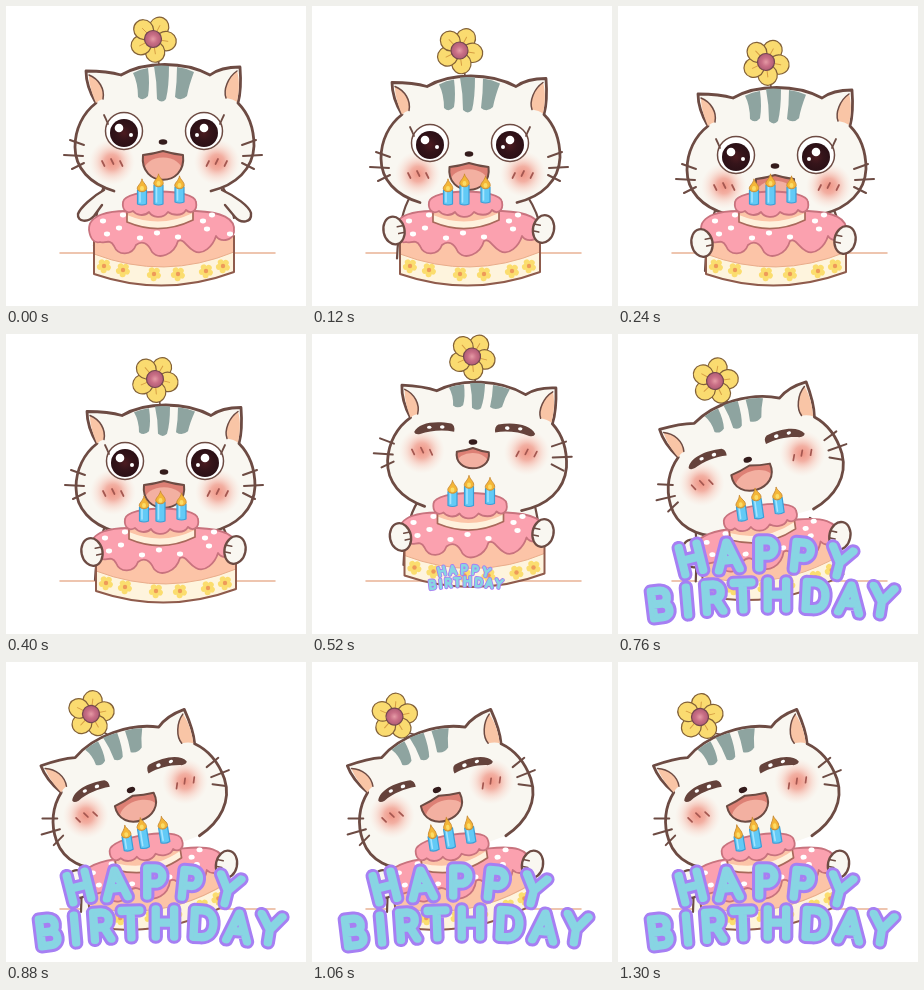
Write an HTML page with a canvas that moves like this. It is 300 px wide and 300 px high and loops after 2.3 s.

```html
<!DOCTYPE html>
<html lang="en">
<head>
<meta charset="utf-8">
<title>Happy Birthday</title>
<style>
html, body { margin: 0; width: 100%; height: 100%; overflow: hidden; background: #fff; }
canvas { display: block; width: 300px; height: 300px; }
</style>
</head>
<body>
<canvas id="stage"></canvas>
<script>
const canvas = document.getElementById('stage');
const ratio = window.devicePixelRatio || 1;
canvas.width = canvas.height = 300 * ratio;
const c = canvas.getContext('2d');

const LOOP = 2300, BROWN = '#6d4b43', FUR = '#f9f7f1', PINK = '#fba1af', ROSE = '#c8737e';

// head, nose, flower, cake: x, y, degrees; size: stripe length, mouth width, mouth height
const poses = [
  { t: 0, head: [157, 130, 0], nose: [157, 136, 0], flower: [147, 33, 0], cake: [158, 240, 0],
    left: [80, 212], right: [236, 212], size: [35, 40, 28] },
  { t: 240, head: [157, 153, 0], nose: [157, 160, 0], flower: [148, 56, 2], cake: [158, 240, 0],
    left: [84, 237], right: [227, 234], size: [34, 38, 24] },
  { t: 400, head: [158, 142.5, 0], nose: [158, 138, 0], flower: [149, 45, 4], cake: [160, 229, 0],
    left: [86, 218], right: [229, 216], size: [29, 40, 26] },
  { t: 520, head: [164, 119.5, 2.5], nose: [161, 108, 1], flower: [160, 22.5, 4], cake: [162.5, 213.5, 0],
    left: [88.5, 203], right: [231, 199], size: [26, 32, 19] },
  { t: 640, head: [147, 128, -6], nose: [144, 119, -9], flower: [133, 32, -6], cake: [157, 220.5, -5],
    left: [83, 212], right: [226, 200], size: [26, 38, 22] },
  { t: 880, head: [129.5, 138.5, -20], nose: [125, 128, -19], flower: [85, 52, -20], cake: [151, 226, -9],
    left: [72, 222], right: [220.5, 202.5], size: [26, 41, 25] },
  { t: 1120, head: [130, 138.5, -20], nose: [125, 128, -19], flower: [82, 55, -22], cake: [151, 226, -9],
    left: [72, 222], right: [220.5, 202.5], size: [26, 41, 25] }
];
const textScale = { 8: 0.3, 9: 1.1, 10: 0.8, 11: 1.04 };

function poseAt(t) {
  const n = poses.findIndex(p => p.t > t);
  if (n < 0) return poses[poses.length - 1];
  const a = poses[n - 1], b = poses[n];
  const u = (t - a.t) / (b.t - a.t);
  const k = a.t === 640 ? 1 - (1 - u) * (1 - u) : (1 - Math.cos(Math.PI * u)) / 2;
  const out = {};
  for (const key in a) if (key !== 't') out[key] = a[key].map((v, i) => v + (b[key][i] - v) * k);
  return out;
}

function at(x, y, deg, draw) {
  c.save();
  c.translate(x, y);
  c.rotate(deg * Math.PI / 180);
  draw();
  c.restore();
}

function shape(d, fill, stroke, width = 2) {
  const p = typeof d === 'string' ? new Path2D(d) : d;
  if (fill) { c.fillStyle = fill; c.fill(p); }
  if (stroke) { c.strokeStyle = stroke; c.lineWidth = width; c.stroke(p); }
}

function oval(x, y, rx, ry, fill, stroke, width, turn = 0) {
  const p = new Path2D();
  p.ellipse(x, y, rx, ry, turn, 0, Math.PI * 2);
  shape(p, fill, stroke, width);
}

function glow(x, y, r, stops) {
  const g = c.createRadialGradient(x, y, 0, x, y, r);
  stops.forEach((s, i) => g.addColorStop(i / (stops.length - 1), s));
  oval(x, y, r, r, g);
}

function petals(x, y, dist, r, turn, fill, stroke) {
  for (let i = 0; i < 5; i++) {
    const a = turn + i * Math.PI * 0.4;
    oval(x + dist * Math.cos(a), y + dist * Math.sin(a), r, r * 0.95, fill, stroke, 1.2, a);
  }
}

function drawFlower(p) {
  const [x, y, deg] = p.flower, a = p.head[2] * Math.PI / 180;
  const sx = p.head[0] - 4 * Math.cos(a) + 72 * Math.sin(a);
  const sy = p.head[1] - 4 * Math.sin(a) - 72 * Math.cos(a);
  shape(`M${x} ${y}Q${x + 4} ${y + 15} ${sx} ${sy}`, null, BROWN, 1.6);
  at(x, y, deg, () => {
    const turn = -1.1;
    petals(0, 0, 13.2, 10.2, turn, '#fadb70', '#826037');
    for (let i = 0; i < 5; i++) {
      const t = turn + i * Math.PI * 0.4;
      shape(`M${8 * Math.cos(t)} ${8 * Math.sin(t)}L${15 * Math.cos(t)} ${15 * Math.sin(t)}`, null, '#d69d43', 1);
    }
    glow(0, 0, 8.5, ['#e59aa5', '#c96f86', '#b05c75']);
    oval(0, 0, 8.5, 8.5, null, '#744750', 1.2);
  });
}

function drawHead(p) {
  at(...p.head, () => {
    c.translate(-157, -130);
    shape(`M108 185C84 178 69 162 69 141C69 123 77 107 90 97C84 87 80 76 80 65
      C92 65 105 66 115 69C139 55 178 55 204 69C212 63 223 61 234 61
      C235 74 235 86 232 97C243 108 248 124 248 140C247 163 230 179 205 185`, FUR, BROWN, 2.8);
    shape('M83 69C93 73 99 83 97 93Q93 94 90 97C86 88 83 78 83 69Z', '#f9c5a6');
    shape('M83 69C93 73 99 83 97 93', null, BROWN, 1.5);
    shape('M231 65C222 71 217 84 220 92Q227 93 231 96C233 86 234 75 231 65Z', '#f9c5a6');
    shape('M231 65C222 71 217 84 220 92', null, BROWN, 1.5);
    c.translate(-1, 60);
    c.scale(1, p.size[0] / 35);
    shape('M128 7Q135 3 143 2Q145 18 143 30Q138 36 133 31Q133 17 128 7Z', '#8ea4a0');
    shape('M149 0Q156 -1 164 0Q164 21 161 33Q157 38 152 33Q152 16 149 0Z', '#8ea4a0');
    shape('M172 1Q181 2 189 6Q184 19 182 30Q176 36 170 31Q172 16 172 1Z', '#8ea4a0');
  });
}

function openEye(x, side) {
  oval(x, -11, 18.5, 18.5, '#fff', BROWN, 1.5);
  glow(x, -9, 14, ['#4c1b20', '#35141a', '#2b1016']);
  oval(x - 5 * (side < 0 ? 1 : 0), -14, 4.3, 4.3, '#fff');
  oval(x + 7 * (side < 0 ? 1 : -1), -7, 2, 2, '#fff');
  shape(`M${x + side * 16} -18Q${x + side * 18} -23 ${x + side * 20} -27`, null, BROWN, 1.8);
}

function shutEye(x, y, side) {
  c.save();
  c.translate(x, y);
  c.scale(side, 1);
  shape('M-20 4C-16 -5 0 -8 17 -5Q21 -3 20 3C9 1 -4 2 -14 6Q-19 7 -20 4Z', '#65423b');
  oval(-5, -1, 2.2, 1.6, '#fff');
  oval(8, -1.5, 2.3, 1.8, '#fff');
  c.restore();
}

function drawFace(p, happy) {
  at(...p.nose, () => {
    const by = happy ? 9.5 : 20;
    for (const s of [-1, 1]) {
      const bx = s < 0 ? -51 : 54;
      glow(bx, by, 23, ['rgba(238,142,126,.95)', 'rgba(241,156,141,.78)', 'rgba(247,196,183,.42)', 'rgba(250,222,212,0)']);
      for (const k of [-1, 0, 1])
        shape(`M${bx + k * 9 + s} ${by - 3 + k * k * 2}l${-s * 2.5} 5`, null, '#a45750', 1.7);
      shape(`M${s * 79} 3L${s * 93} -2M${s * 80} 14L${s * 99} 13M${s * 79} 21L${s * 91} 27`, null, BROWN, 2);
    }
    if (happy) {
      shutEye(-39, -13, 1);
      shutEye(42, -13, -1);
    } else {
      openEye(-39, -1);
      openEye(41, 1);
    }
    oval(0, 0, 4.3, 2.8, '#351c1c');

    const [, w, h] = p.size, x = w / 2, top = happy ? 8 : 11;
    const m = new Path2D(`M${-x} ${top + 2}Q${-x / 2} ${top + 1} 0 ${top - 2}Q${x / 2} ${top + 1} ${x} ${top + 2}
      C${x * 1.2} ${top + h * 1.25} ${-x * 1.2} ${top + h * 1.25} ${-x} ${top + 2}Z`);
    shape(m, '#dd8075');
    c.save();
    c.clip(m);
    oval(0, top + h * 0.68, x * 0.98, h * 0.52, '#f3b0a1');
    c.restore();
    shape(m, null, BROWN, 2);
  });
}

function drawBody(p, raised) {
  const [hx, hy] = p.head, [lx, ly] = p.left, [rx, ry] = p.right;
  const x1 = hx - 58, x2 = hx + 58, y1 = hy + 48;
  const l = raised ? 88 : lx + 3, r = raised ? 228 : rx - 3;
  shape(`M${x1} ${y1}Q${l + 2} ${y1 + 18} ${l} ${ly + 28}L${r} ${ry + 28}Q${r - 2} ${y1 + 18} ${x2} ${y1}Z`, FUR);
  shape(`M${x1} ${y1}Q${l + 2} ${y1 + 18} ${l} ${ly + 28}`, null, BROWN, 2.2);
  shape(`M${x2} ${y1}Q${r - 2} ${y1 + 18} ${r} ${ry}`, null, BROWN, 2.2);
  if (raised) at(0, hy - 130, 0, () => {
    shape('M98 184C87 190 74 202 72 208C71 216 82 217 88 210L96 199', FUR, BROWN, 2.4);
    shape('M216 184C229 190 243 200 245 207C246 217 235 218 229 211L219 199', FUR, BROWN, 2.4);
  });
}

function drawFlame(x, y, s) {
  at(x, y, 0, () => {
    c.scale(s, 2 - s);
    shape('M0 -7C1 -3 5 -1 4.5 3C3 7 -3 7 -4.5 3C-5 0 -1 -2 0 -7Z', '#f4b637', '#c98b35', 0.9);
    oval(0, 2.5, 1.9, 2.5, '#fbdc66');
  });
}

function drawCake(p, step) {
  at(...p.cake, () => {
    c.translate(-158, -240);
    shape('M88 222V268Q158 292 228 266V222Z', '#fcc4a7');
    shape('M88 248Q158 275 228 246V266Q158 292 88 268Z', '#fef4dd');
    shape('M88 248Q158 275 228 246', null, '#e9ad8b', 1);
    for (const [x, y] of [[98, 260], [117, 264], [148, 268], [172, 268], [200, 265], [217, 260]]) {
      petals(x, y, 4, 3.2, 0.4, '#fbdd6e');
      oval(x, y, 2.2, 2.2, '#ee9a5a');
    }
    shape('M88 230V268Q158 292 228 266V230', null, '#8f5b4c', 2);
    shape(`M83 224C82 208 105 205 120 205H190C215 206 230 212 228 226C226 236 214 236 210 230
      C207 240 197 250 188 245C180 241 178 232 172 235C168 249 153 254 146 246C142 237 136 234 130 239
      C126 250 112 250 108 240C104 232 98 238 94 236C88 238 84 232 83 224Z`, PINK, ROSE, 1.8);
    for (const [x, y] of [[117, 209], [97, 215], [113, 222], [101, 228], [134, 232], [151, 227],
      [172, 231], [197, 215], [206, 209], [201, 223], [224, 228]]) oval(x, y, 3.1, 2.4, '#fff');

    shape('M121 199V216Q154 230 187 214V199Z', '#fef1dd');
    shape('M121 199V209Q154 223 187 207V199Z', '#fcc4a7');
    shape('M121 199V216Q154 230 187 214V199', null, '#a9695b', 1.7);
    shape(`M117 196C119 182 189 182 190 196C192 206 184 208 180 204C176 211 166 209 162 206
      C156 214 146 211 143 206C138 211 130 209 127 205C120 209 116 203 117 196Z`, PINK, ROSE, 1.8);
    for (const [x, y, h] of [[136, 184, 14], [152.5, 179, 19], [173.5, 181, 15]]) {
      shape(`M${x - 4.5} ${y}h9v${h}q-4.5 2 -9 0Z`, '#62caf6', '#3a9ed6', 1.2);
      shape(`M${x - 2} ${y + 2}v${h - 4}`, null, '#a5e4ff', 1.6);
      drawFlame(x, y - 4, step % 2 ? 0.92 : 1.04);
    }
  });
}

function drawPaw(x, y, side) {
  at(x, y, side * 12, () => {
    oval(0, 0, 10.5, 14, FUR, BROWN, 2.3);
    shape(`M${-side * 9} -3h${side * 5}M${-side * 9} 4h${side * 5}`, null, BROWN, 1.6);
  });
}

// letter, x, y, degrees
const words = [
  [['H', 73, 225, -14], ['A', 110, 222, -6], ['P', 148, 220, 0], ['P', 184, 222, 6], ['Y', 222, 228, 14]],
  [['B', 42, 270, -7], ['I', 69, 267, -5], ['R', 95, 264, -4], ['T', 125, 262, -2],
   ['H', 159, 261, 0], ['D', 197, 262, 3], ['A', 232, 265, 6], ['Y', 264, 267, 9]]
];

function drawText(scale) {
  at(154, scale > 1.05 ? 242 : scale < 1 ? 243.5 : 246, 0, () => {
    c.scale(scale, scale);
    c.translate(-154, -246);
    c.font = '100 38px Inter, "Liberation Sans", sans-serif';
    c.textAlign = 'center';
    c.textBaseline = 'alphabetic';
    for (const word of words) {
      for (const [color, width] of [['#a67ff3', 13.5], ['#88d5e3', 7.5]]) {
        c.strokeStyle = c.fillStyle = color;
        c.lineWidth = width;
        for (const [ch, x, y, deg] of word) at(x, y, deg, () => {
          c.strokeText(ch, 0, 13.8);
          c.fillText(ch, 0, 13.8);
        });
      }
    }
  });
}

function draw(time) {
  const t = time % LOOP;
  const step = t < 340 ? Math.min(4, Math.floor(t / 60)) : Math.min(21, Math.floor((t - 40) / 60));
  const p = poseAt(step * 60 + (step > 4 ? 40 : 0));
  const raised = step < 2;
  c.setTransform(ratio, 0, 0, ratio, 0, 0);
  c.fillStyle = '#fff';
  c.fillRect(0, 0, 300, 300);
  c.lineJoin = c.lineCap = 'round';
  shape('M54 247H269', null, '#e9b295', 1.5);
  drawBody(p, raised);
  drawFlower(p);
  drawHead(p);
  drawFace(p, step >= 8);
  drawCake(p, step);
  if (!raised) {
    drawPaw(...p.left, -1);
    drawPaw(...p.right, 1);
  }
  if (step >= 8) drawText(textScale[step] || 1);
}

const start = performance.now();
function tick() {
  draw(performance.now() - start);
  requestAnimationFrame(tick);
}
tick();
</script>
</body>
</html>
```
